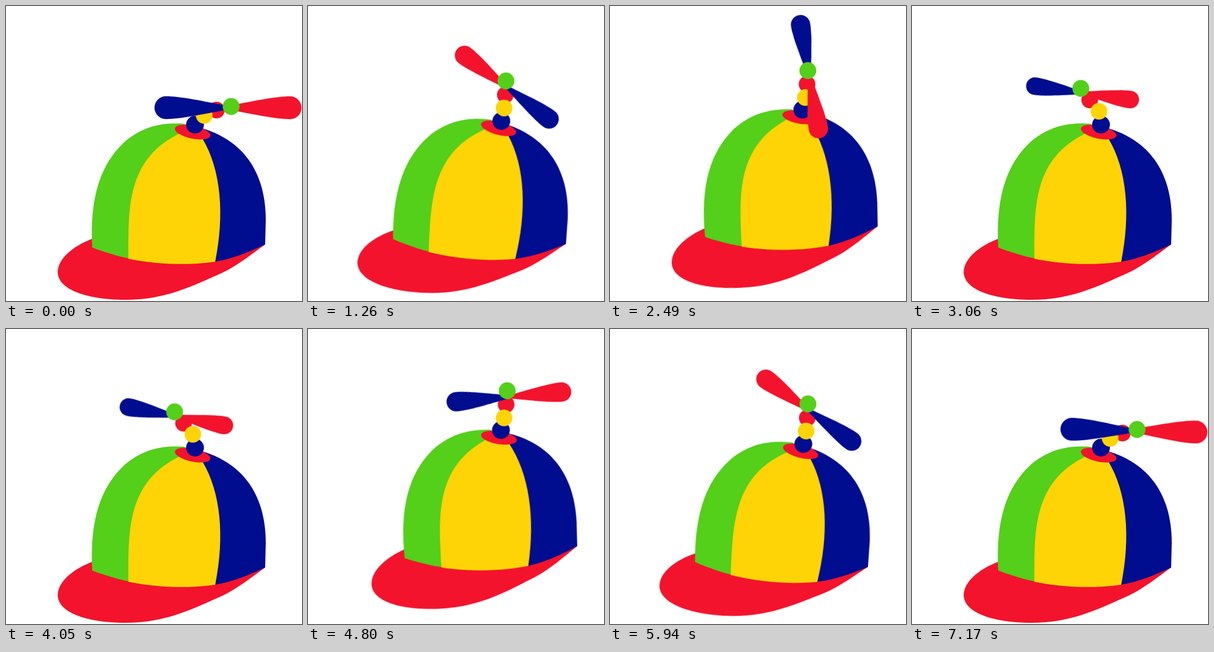
An HTML page without scripts for the animation above (7.2 s loop, 498x496 px).

```html
<!DOCTYPE html>
<html lang="en">
<head>
<meta charset="utf-8">
<title>Propeller cap</title>
<style>
  html, body { margin: 0; width: 100%; height: 100%; overflow: hidden; background: #fff; }
  svg { display: block; width: 100vw; height: 100vh; }

  .red { fill: #f3132c; }
  .yellow { fill: #ffd406; }
  .green { fill: #54cf1a; }
  .navy { fill: #000d8f; }

  /* Everything swings out and back along the same path */
  .move { animation: 3600ms ease-in-out infinite alternate; }
  .cap { animation-name: hop; transform-origin: 436px 401px; }
  .low { animation-name: low; }
  .mid { animation-name: mid; }
  .hub { animation-name: hub; }
  .prop { animation-name: prop; }
  .spin { animation-name: spin; animation-timing-function: linear; }

  @keyframes hop {
    0%, 22% { transform: translate(0, 0) rotate(0deg); }
    32% { transform: translate(-4px, -1px) rotate(2.6deg); }
    35% { transform: translate(-2px, -1px) rotate(2.6deg); }
    42% { transform: translate(10px, -21px) rotate(-3deg); }
    55% { transform: translate(12.5px, -31px) rotate(2.6deg); }
    66.67% { transform: translate(17px, -36px) rotate(-3deg); }
    76%, 100% { transform: translate(0, 0) rotate(0deg); }
  }

  /* The stem beads lean right, straighten, then lean left */
  @keyframes low {
    0% { transform: translate(333.5px, 184px); }
    27%, 35% { transform: translate(321.7px, 177.5px); }
    45% { transform: translate(331px, 180px); }
    55% { transform: translate(322.5px, 178px); }
    66.67% { transform: translate(324.3px, 179.4px); }
    85% { transform: translate(314.5px, 177px); }
    100% { transform: translate(311px, 179px); }
  }
  @keyframes mid {
    0% { transform: translate(354px, 175px); }
    27%, 35% { transform: translate(322.7px, 155.4px); }
    45% { transform: translate(347px, 162px); }
    55% { transform: translate(324px, 155px); }
    66.67% { transform: translate(329px, 157px); }
    85% { transform: translate(299px, 158px); }
    100% { transform: translate(294px, 167px); }
  }
  @keyframes hub {
    0% { transform: translate(378.7px, 169px); }
    27%, 35% { transform: translate(322.7px, 131.9px); }
    45% { transform: translate(364px, 147px); }
    55% { transform: translate(324px, 132px); }
    66.67% { transform: translate(332px, 134px); }
    85% { transform: translate(284px, 138.5px); }
    100% { transform: translate(278px, 153px); }
  }
  @keyframes prop {
    0% { transform: translate(373.5px, 171px) scale(1.175); }
    27%, 35% { transform: translate(324.6px, 142.3px) scale(1); }
    45% { transform: translate(363px, 155px) scale(1.08); }
    55% { transform: translate(326px, 141.3px) scale(1); }
    66.67% { transform: translate(334.3px, 144.4px) scale(1); }
    85% { transform: translate(287px, 146px) scale(.91); }
    100% { transform: translate(282px, 158px) scale(1.1); }
  }

  @keyframes spin {
    0% { transform: rotate(0deg); }
    .833% { transform: rotate(1.35deg); }
    3.33% { transform: rotate(10deg); }
    6.67% { transform: rotate(36deg); }
    10.83% { transform: rotate(90deg); }
    16.67% { transform: rotate(190deg); }
    25% { transform: rotate(360deg); }
    35% { transform: rotate(573.8deg); }
    45% { transform: rotate(768deg); }
    55% { transform: rotate(983.4deg); }
    60.83% { transform: rotate(1200deg); }
    66.67% { transform: rotate(1439deg); }
    71.67% { transform: rotate(1605deg); }
    76.67% { transform: rotate(1728deg); }
    80.83% { transform: rotate(1785deg); }
    85% { transform: rotate(1808deg); }
    100% { transform: rotate(1825deg); }
  }
</style>
</head>
<body>
<svg viewBox="0 0 498 496">
  <defs>
    <path id="blade" d="M2 -3C35 -9 68 -16.3 89 -16.3A16.3 16.3 0 0 1 89 16.3C68 16.3 35 9 2 3Z"/>
  </defs>
  <g class="move cap">
    <path class="red" d="M146 391C112 404 87 425 87 448C88 478 140 494 200 494C270 494 315 470 365 448C390 436 415 416 436 401L300 390Z"/>
    <path class="green" d="M145 406C140 310 165 260 201 227C235 200 265 196 300 198L320 212L230 429C200 424 170 416 145 406Z"/>
    <path class="navy" d="M320 203L331 206C385 222 437 265 437 360L436 401C400 418 378 425 352 430L320 431Z"/>
    <path class="yellow" d="M206 425C206 340 202 255 297 212L330 222C362 275 368 350 352 430C300 437 250 434 206 425Z"/>
    <ellipse class="red" cx="314" cy="212" rx="30.5" ry="11" transform="rotate(12 314 212)"/>
    <circle class="move mid red" r="14"/>
    <circle class="navy" cx="318" cy="199.5" r="15"/>
    <circle class="move low yellow" r="14"/>
    <g class="move prop">
      <g class="move spin">
        <use href="#blade" class="red"/>
        <use href="#blade" class="navy" transform="rotate(180)"/>
      </g>
    </g>
    <circle class="move hub green" r="14.2"/>
  </g>
</svg>
</body>
</html>
```
